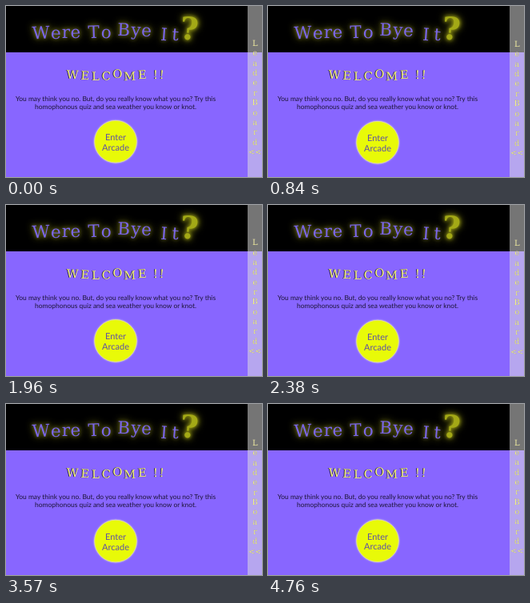
These frames come from a looping animation (320x214 px, 4830 ms). An HTML page:

```html
<!DOCTYPE html>
<html lang="en">
<head>
<meta charset="utf-8">
<title>Homophone quiz</title>
<style>
  html, body { margin: 0; width: 100%; height: 100%; overflow: hidden; background: #8866ff; }
  svg { display: block; width: 100%; height: 100%; }
  text { text-anchor: middle; text-rendering: geometricPrecision; }
  .slab { font-family: "DejaVu Serif", serif; }
  .sans { font-family: Lato, sans-serif; }
  #title { font-size: 21.5px; fill: #7a66ea; filter: drop-shadow(0 0 2px #68681a) drop-shadow(0 0 4px #6c6c10); }
  #mark { font-size: 39px; font-weight: bold; fill: #a3a916; }
  #welcome { font-size: 14.5px; fill: #f5f672; filter: drop-shadow(-.8px .9px .5px #2a2050); }
  #intro { font-size: 8.45px; fill: #1d1538; }
  #board { font-size: 10px; fill: #f2f386; filter: drop-shadow(.6px .6px .5px #7468b4); }
  #button { font-size: 11px; fill: #5f4fa6; }
  #button circle { fill: #e8fa08; stroke: #e2e08c; filter: drop-shadow(.5px .6px .8px #d3c8f2); }
</style>
</head>
<body>
<svg viewBox="0 0 320 214" preserveAspectRatio="none">
  <rect width="320" height="58" fill="#000"/>
  <g id="title" class="slab"></g>
  <g id="mark" class="slab"><text x="229" y="42" transform="rotate(5 229 30)">?</text></g>
  <g id="welcome" class="slab"></g>
  <g id="intro" class="sans">
    <text x="137" y="119">You may think you no. But, do you really know what you no? Try this</text>
    <text x="137" y="129">homophonous quiz and sea weather you know or knot.</text>
  </g>
  <g id="button" class="sans">
    <circle cx="137" cy="169.4" r="26.3"/>
    <text x="137" y="167.8">Enter</text>
    <text x="137" y="180.6">Arcade</text>
  </g>
  <rect x="302" width="18" height="214" fill="#e1e1e1" fill-opacity=".52"/>
  <g id="board" class="slab"></g>
</svg>
<script>
const LOOP = 4830, STEP = 70, PERIOD = 1000;
const $ = id => document.getElementById(id);
const escape = s => s.replace(/</g, '&lt;');

// Each letter: [text, x, baseline, tilt]
function letters(id, list) {
  $(id).innerHTML = list.map(([s, x, y, tilt = 0]) =>
    `<text x="${x}" y="${y}" transform="rotate(${tilt} ${x} ${y})">${escape(s)}</text>`).join('');
}

letters('title', [
  ['W', 44, 41, -3], ['e', 62, 41, 2], ['r', 75, 40], ['e', 87, 40, -2],
  ['T', 110, 40, -2], ['o', 125, 40, 3],
  ['B', 147, 37, 2], ['y', 162, 37, 3], ['e', 175, 38, 4],
  ['I', 197, 43, 4], ['t', 211, 43, 5]
]);
letters('welcome', [
  ['W', 83, 91, 2], ['E', 98.5, 92, 3], ['L', 112, 93, -1], ['C', 125, 92.5, 3],
  ['O', 139.5, 89.5], ['M', 155, 93, -2], ['E', 170.5, 91, -3], ['!', 187, 91], ['!', 194.5, 91, 4]
]);
letters('board', [...'LeaderBoard', '<<'].map((s, i) => [s, 311.3, 49.8 + i * 12.35]));

function draw(now) {
  const t = Math.floor(now % LOOP / STEP) * STEP;
  const wave = (1 - Math.cos(2 * Math.PI * (t / PERIOD - 0.12))) / 2;
  const bob = `translate(0 ${(wave * 2.2).toFixed(2)})`;
  $('button').setAttribute('transform', bob);
  $('board').setAttribute('transform', bob);
  $('mark').style.filter =
    `drop-shadow(0 0 ${2 + wave * 0.4}px #a0a416) drop-shadow(0 0 ${4 + wave * 0.4}px #969a12)`;
}

const start = performance.now();
function tick() {
  draw(performance.now() - start);
  requestAnimationFrame(tick);
}
tick();
</script>
</body>
</html>
```
